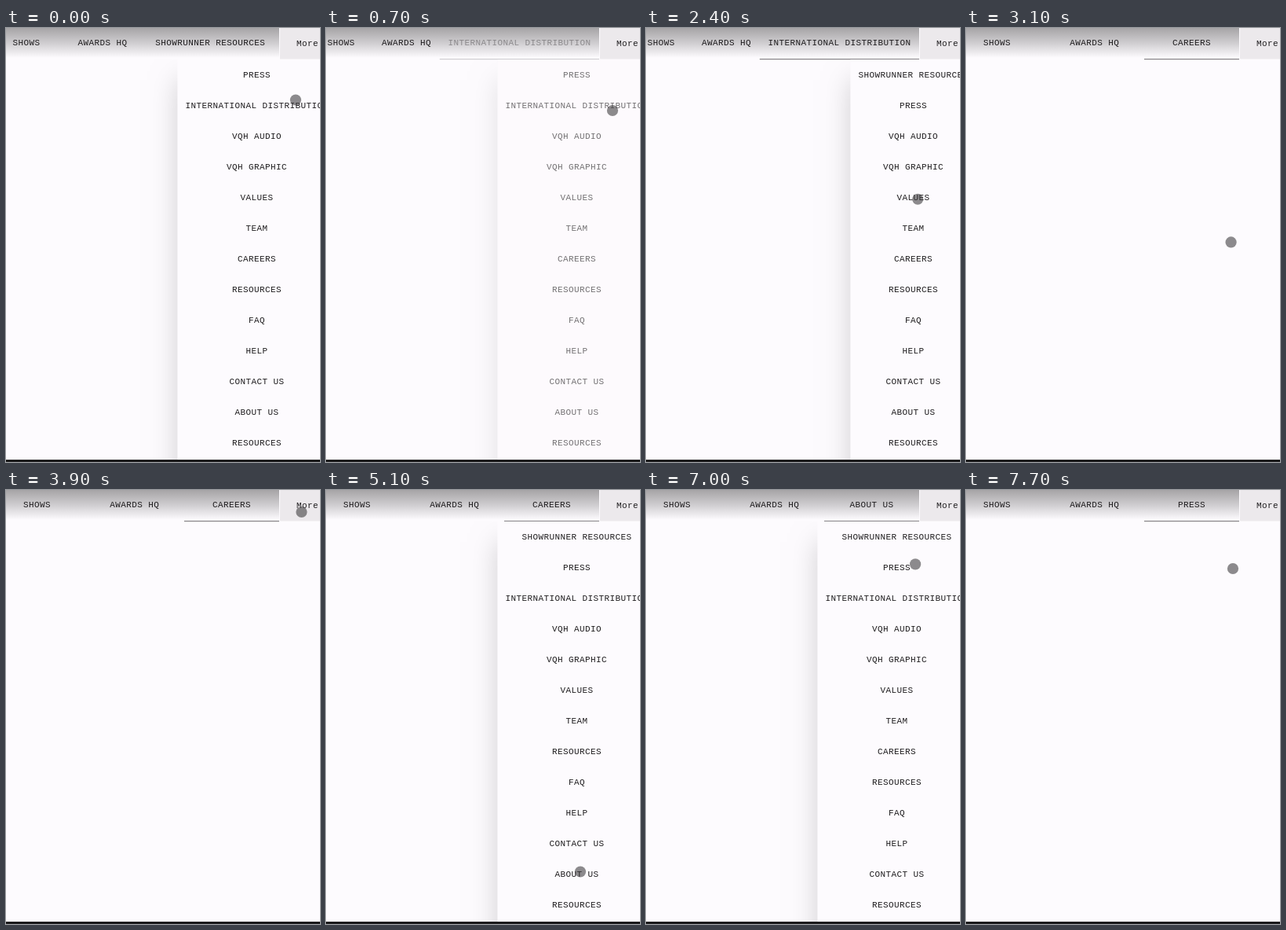
Animation of 400 by 552 pixels, one loop 8000 ms. Source, as an HTML page with a canvas:

```html
<!DOCTYPE html>
<html lang="en">
<head>
<meta charset="utf-8">
<title>Overflow navigation</title>
<style>
  html, body { margin: 0; width: 100%; height: 100%; overflow: hidden; background: #fdfbfe; }
  canvas { display: block; width: 400px; height: 552px; }
</style>
</head>
<body>
<canvas id="stage"></canvas>
<script>
const W = 400, H = 552, LOOP = 8000;
const PITCH = 7, ROW = 39, BAR = 40, FLOOR = 549;
const MENU_RIGHT = 420.5, MORE_X = 348, NAV_LEFT = -21.5;
const FADE = 160, REACH = 750;
const PAPER = '#fdfbfe', INK = '#1f1d1f';

const canvas = document.getElementById('stage');
const ctx = canvas.getContext('2d');
const ratio = window.devicePixelRatio || 1;
canvas.width = W * ratio;
canvas.height = H * ratio;
ctx.scale(ratio, ratio);

const ITEMS = ['SHOWRUNNER RESOURCES', 'PRESS', 'INTERNATIONAL DISTRIBUTION', 'VQH AUDIO',
  'VQH GRAPHIC', 'VALUES', 'TEAM', 'CAREERS', 'RESOURCES', 'FAQ', 'HELP',
  'CONTACT US', 'ABOUT US', 'RESOURCES'];

// The pointer rests at home, opens the menu, reaches aim, picks an item, then leaves
const VISITS = [
  { open: -450, pick: 640, leave: 1100, item: 2, home: [390, 20], aim: [365, 105] },
  { open: 2050, pick: 2940, leave: 2940, item: 7, home: [377, 22], aim: [334, 295] },
  { open: 4060, pick: 5240, leave: 5240, item: 12, home: [376.5, 28], aim: [324, 485.5] },
  { open: 6450, pick: 7520, leave: LOOP, item: 1, home: [384, 20], aim: [340, 100] }
];

const clamp = v => Math.max(0, Math.min(1, v));
const easeOut = u => 1 - (1 - u) ** 2;
const easeInOut = u => u * u * (3 - 2 * u);
const mix = (a, b, u) => a + (b - a) * u;
const textWidth = text => text.length * PITCH;

function pointer(t, visit, next) {
  const leaving = t >= visit.leave && next;
  const from = leaving ? visit.aim : visit.home;
  const to = leaving ? next.home : visit.aim;
  const u = leaving
    ? easeInOut(clamp((t - visit.leave) / Math.min(900, next.open - visit.leave)))
    : easeOut(clamp((t - visit.open) / REACH));
  return from.map((v, axis) => mix(v, to[axis], u));
}

function centered(text, x, y) {
  ctx.fillText(text, x - textWidth(text) / 2, y);
}

function drawHeader(item, alpha, underlined) {
  const shade = ctx.createLinearGradient(0, 0, 0, 38);
  shade.addColorStop(0, '#a6a4a6');
  shade.addColorStop(0.5, '#cfcdd0');
  shade.addColorStop(1, PAPER);
  ctx.fillStyle = shade;
  ctx.fillRect(0, 0, MORE_X, 38);
  ctx.fillStyle = '#ece9ec';
  ctx.fillRect(MORE_X + 1, 0, W - MORE_X - 1, BAR - 0.5);

  // The promoted tab takes what it needs; the fixed tabs share the rest
  const tab = Math.max(121, 84 + textWidth(item) * 0.655);
  const tabX = MORE_X - tab;
  const split = mix(NAV_LEFT, tabX, 0.49);
  ctx.fillStyle = INK;
  centered('SHOWS', (NAV_LEFT + split) / 2, 22);
  centered('AWARDS HQ', (split + tabX) / 2, 22);
  ctx.fillText('More', 370, 23);

  ctx.globalAlpha = alpha;
  centered(item, tabX + tab / 2, 22);
  if (underlined) {
    ctx.fillStyle = '#858386';
    ctx.fillRect(tabX, 39, tab, 1.2);
  }
  ctx.globalAlpha = 1;
}

function drawMenu(hidden, alpha) {
  const rows = ITEMS.filter((_, i) => i !== hidden);
  const width = Math.max(...rows.map(textWidth)) + 20;
  const left = MENU_RIGHT - width;

  ctx.save();
  ctx.globalAlpha = alpha;
  ctx.fillStyle = PAPER;
  ctx.fillRect(left, BAR, width, FLOOR - BAR);
  ctx.fillStyle = INK;
  rows.forEach((row, i) => centered(row, left + width / 2, 63 + i * ROW));

  // Only the shadow outside the panel is painted, so fading stays clean
  ctx.beginPath();
  ctx.rect(0, BAR, left, FLOOR - BAR);
  ctx.clip();
  ctx.shadowColor = 'rgba(0,0,0,.18)';
  ctx.shadowBlur = 32 * ratio;
  ctx.shadowOffsetY = 26 * ratio;
  ctx.fillStyle = PAPER;
  ctx.fillRect(left, BAR, width, H);
  ctx.restore();
}

function draw(t) {
  ctx.fillStyle = PAPER;
  ctx.fillRect(0, 0, W, H);
  ctx.font = '11px "Liberation Mono", monospace';
  ctx.letterSpacing = '0.4px';

  const index = VISITS.filter(v => v.open <= t).length - 1;
  const visit = VISITS[index];
  const before = index ? VISITS[index - 1].item : 0;
  const picked = t >= visit.pick;
  const done = clamp((t - visit.pick) / FADE);

  drawHeader(ITEMS[picked ? visit.item : before], picked ? done : 1, picked || index > 0);
  if (done < 1) drawMenu(before, Math.min(clamp((t - visit.open) / FADE), 1 - done));

  ctx.fillStyle = '#1c1b1c';
  ctx.fillRect(0, FLOOR, W, H - FLOOR);

  ctx.fillStyle = 'rgba(62,60,62,.59)';
  ctx.beginPath();
  ctx.arc(...pointer(t, visit, VISITS[index + 1]), 7.1, 0, Math.PI * 2);
  ctx.fill();
}

const start = performance.now();
function frame() {
  draw((performance.now() - start) % LOOP);
  requestAnimationFrame(frame);
}
frame();
</script>
</body>
</html>
```
